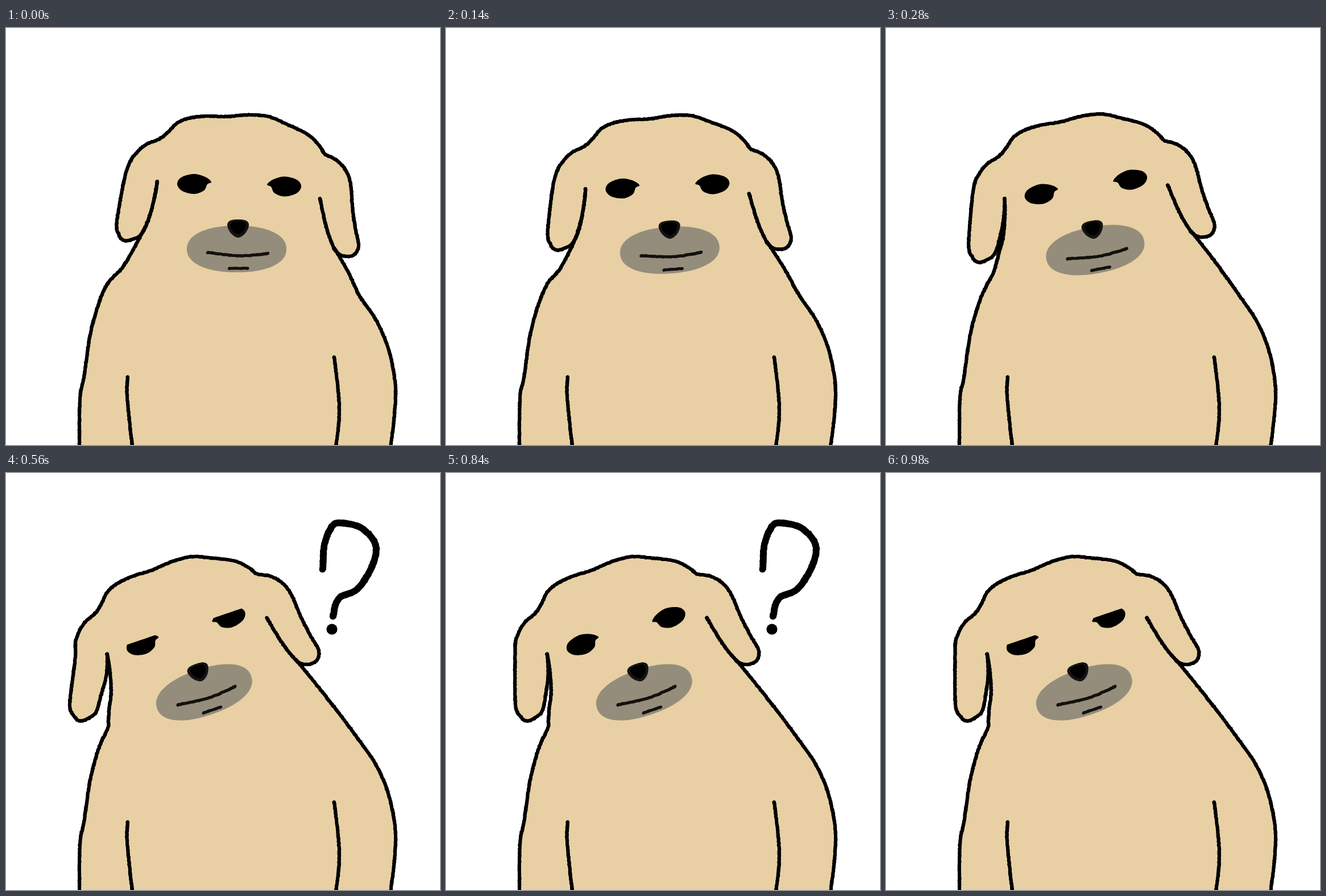
An HTML page with a canvas that plays this animation: 763x734 px, repeating every 1.54 s.

```html
<!DOCTYPE html>
<html lang="en">
<head>
<meta charset="utf-8">
<title>Puzzled dog</title>
<style>
html, body { margin: 0; width: 100%; height: 100%; overflow: hidden; background: #fff; }
canvas { display: block; width: 763px; height: 734px; }
</style>
</head>
<body>
<canvas id="stage" width="763" height="734"></canvas>
<script>
const ctx = document.getElementById('stage').getContext('2d');
const FUR = '#e8d0a4', GREY = '#958d7b', INK = '#000', SOFT = '#12110f';
const LOOP = 1540, STEP = 140, MAX_TURN = -18.8;

// The head is drawn upright, then turned about the point between the eyes
const PIVOT = [410, 277], EAR_ROOT = [245, 206];
const innerEar = [266,270, 260,303, 250,338, 238,363];
const ear = [...innerEar, 222,372, 207,374, 198,363, 195,340, 209,262, 222,229, 245,206];
const crown = [
  270,195, 285,183, 303,166, 325,158, 355,155, 385,156, 428,153, 462,156, 495,170,
  530,187, 550,206, 561,222, 580,232, 597,250, 606,275, 609,315, 614,352, 620,382,
  613,398, 599,402, 584,397, 574,382, 562,346, 552,300];
const eye = [301,275, 308,263, 330,257, 350,262, 361,271, 354,275, 348,286, 331,292, 310,287];
const nose = [389,346, 397,338, 419,338, 427,346, 421,361, 408,369, 395,361];
const mouth = [355,395, 410,401, 460,397];
const chin = [393,423, 425,423];

// These stay put on the stage
const sideL = [179,449, 163,485, 148,540, 137,615, 130,652, 129,745];
const sideR = [622,472, 650,513, 669,555, 680,597, 685,640, 682,690, 675,745];
const arms = [[214,614, 213,650, 223,745], [577,579, 586,670, 579,745]];
const hook = [557,169, 560,125, 574,93, 590,88, 625,97, 650,127, 643,165, 618,204, 585,221, 575,252];

const tilt = { at: [316.5, 278.5], turn: MAX_TURN, swing: 4.5, lids: true };
const poses = [
  { at: PIVOT, turn: 0, swing: 0 },
  { at: [389.5, 279], turn: -4.3, swing: 0.4 },
  { at: [351.5, 280], turn: -10.7, swing: 2.7 },
  tilt,
  { ...tilt, swing: 8.5, ask: true },
  tilt,
  { ...tilt, lids: false, ask: true },
  tilt];

function pairs(flat) {
  const out = [];
  for (let i = 0; i < flat.length; i += 2) out.push([flat[i], flat[i + 1]]);
  return out;
}

function rotate([x, y], [cx, cy], deg, [tx, ty] = [cx, cy]) {
  const a = deg * Math.PI / 180, c = Math.cos(a), s = Math.sin(a);
  return [tx + (x - cx) * c - (y - cy) * s, ty + (x - cx) * s + (y - cy) * c];
}

const mix = (a, b, t, dx) => [a[0] + (b[0] - a[0]) * t + dx, a[1] + (b[1] - a[1]) * t];

// Smooth curve through the points, sampled about every 1.5 px
function curve(p, closed) {
  const n = p.length, out = [];
  const at = i => closed ? p[(i + n) % n] : p[Math.max(0, Math.min(n - 1, i))];
  for (let i = 0; i < (closed ? n : n - 1); i++) {
    const [a, b, c, d] = [at(i - 1), at(i), at(i + 1), at(i + 2)];
    const steps = Math.ceil(Math.hypot(c[0] - b[0], c[1] - b[1]) / 1.5);
    for (let s = 0; s < steps; s++) {
      const t = s / steps;
      out.push([0, 1].map(k => b[k] + 0.5 * t * (c[k] - a[k] +
        t * (2 * a[k] - 5 * b[k] + 4 * c[k] - d[k] + t * (3 * (b[k] - c[k]) + d[k] - a[k])))));
    }
  }
  if (!closed) out.push(p[n - 1]);
  return out;
}

function trace(points) {
  ctx.beginPath();
  points.forEach(([x, y]) => ctx.lineTo(x, y));
}

function fill(points, color) {
  trace(points);
  ctx.closePath();
  ctx.fillStyle = color;
  ctx.fill();
}

function dot(x, y, r) {
  ctx.moveTo(x + r, y);
  ctx.arc(x, y, r, 0, Math.PI * 2);
}

// Ink line with a slightly grainy edge
function ink(points, width, color = INK) {
  let seed = 7;
  const rnd = () => (seed = seed * 16807 % 2147483647) / 2147483647 - 0.5;
  trace(points);
  ctx.strokeStyle = ctx.fillStyle = color;
  ctx.lineWidth = width - 0.7;
  ctx.lineCap = ctx.lineJoin = 'round';
  ctx.stroke();
  ctx.beginPath();
  for (const [x, y] of points) dot(x + rnd() * 1.5, y + rnd() * 1.5, width / 2 - 0.3);
  ctx.fill();
}

function drawMuzzle() {
  const round = v => Math.sign(v) * Math.abs(v) ** 0.9;
  const pts = [];
  for (let a = 0; a < Math.PI * 2; a += 0.05)
    pts.push([405.5 + 87.5 * round(Math.cos(a)), 389 + 41 * round(Math.sin(a))]);
  fill(pts, GREY);
}

// Lids cut the top of the eyes flat; the right eye mirrors the left a little lower
function drawEyes(lids) {
  const left = curve(pairs(eye), true).map(([x, y]) => [x, lids ? Math.max(y, 266) : y]);
  fill(left, INK);
  fill(left.map(([x, y]) => [2 * PIVOT[0] - x, y + 4.5]), INK);
}

function drawFace(pose) {
  ctx.save();
  ctx.translate(...pose.at);
  ctx.rotate(pose.turn * Math.PI / 180);
  ctx.translate(-PIVOT[0], -PIVOT[1]);
  drawMuzzle();
  ink(curve(pairs(mouth)), 5.6, SOFT);
  ink(curve(pairs(chin)), 5.4, SOFT);
  const n = curve(pairs(nose), true);
  fill(n, '#151412');
  fill(n.map(p => mix([408, 349], p, 0.72, 0)), INK);
  drawEyes(pose.lids);
  ctx.restore();
}

function drawAsk() {
  ink(curve(pairs(hook)), 12);
  ctx.beginPath();
  dot(573, 275, 9.6);
  ctx.fill();
}

function draw(pose) {
  const place = p => rotate(p, PIVOT, pose.turn, pose.at);
  // The left ear swings more the further it hangs down
  const hang = p => rotate(p, EAR_ROOT, pose.swing * Math.max(0, Math.min(1, (p[1] - 270) / 70)));
  const head = curve([...pairs(ear).map(hang), ...pairs(crown)].map(place));

  // Necks run from the moving head to the fixed shoulders
  const [bodyL, bodyR] = [pairs(sideL), pairs(sideR)];
  const inner = pairs(innerEar).map(place);
  const jaw = place([577, 387]);
  const bulge = 7 * (1 - pose.turn / MAX_TURN);
  const left = curve([...inner, mix(inner[3], bodyL[0], 0.65, bulge), ...bodyL]);
  const right = curve([jaw, mix(jaw, bodyR[0], 0.5, 2), ...bodyR]);

  ctx.fillStyle = '#fff';
  ctx.fillRect(0, 0, 763, 734);
  fill(head, FUR);
  const brow = [[330, 200], [500, 200]].map(place);
  fill([...left.slice().reverse(), ...brow, head[head.length - 1], ...right], FUR);
  [left, right, head, ...arms.map(a => curve(pairs(a)))].forEach(l => ink(l, 6.4));
  drawFace(pose);
  if (pose.ask) drawAsk();
}

const start = performance.now();
let shown = -1;
function tick(now) {
  const t = Math.max(0, now - start) % LOOP;
  const i = Math.min(poses.length - 1, Math.floor(t / STEP));
  if (i !== shown) draw(poses[shown = i]);
  requestAnimationFrame(tick);
}
tick(start);
</script>
</body>
</html>
```
